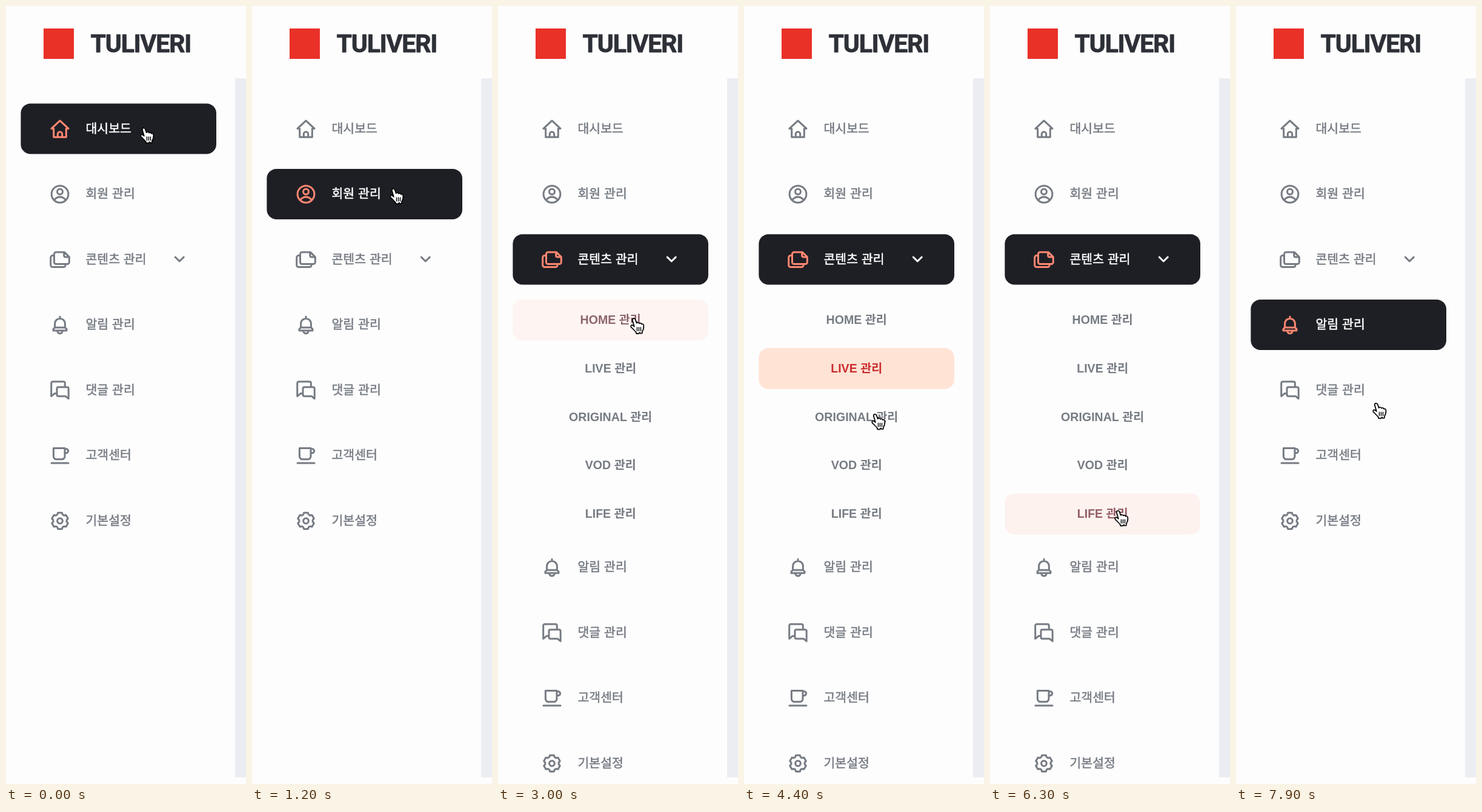
Animation of 396 by 1280 pixels, one loop 8 s. Source, as an HTML page with a canvas:

```html
<!DOCTYPE html>
<html lang="ko">
<head>
<meta charset="utf-8">
<title>관리 메뉴</title>
<style>
html, body { margin: 0; width: 100%; height: 100%; overflow: hidden; background: #fdfdfd; }
canvas { display: block; width: 396px; height: 1280px; }
</style>
</head>
<body>
<canvas id="stage"></canvas>
<script>
const W = 396, H = 1280, LOOP = 8000;
const canvas = document.getElementById('stage');
const ctx = canvas.getContext('2d');
const dpr = window.devicePixelRatio || 1;
canvas.width = W * dpr;
canvas.height = H * dpr;

const PAGE = [253, 253, 253], GREY = [118, 123, 131], DARK = [30, 31, 37];
const WHITE = [255, 255, 255], CORAL = [255, 135, 113], RED = [202, 45, 47];
const BLUSH = [254, 242, 239], PEACH = [255, 228, 214];
const MAIN_FONT = "500 20.5px 'Noto Sans CJK KR', 'Noto Sans CJK', sans-serif";
const SUB_FONT = "bold 19.6px 'Liberation Sans', 'Noto Sans CJK KR', 'Noto Sans CJK', sans-serif";
const LOGO_FONT = "bold 41px Roboto, sans-serif";

// Icon outlines are relative to the icon centre.
const icon = d => new Path2D(d);
const circle = (x, y, r) => `M${x + r} ${y}a${r} ${r} 0 1 1 ${-2 * r} 0a${r} ${r} 0 1 1 ${2 * r} 0z`;

function gear() {
  const points = [];
  for (let i = 0; i < 6; i++) {
    for (const [turn, r] of [[-23, 11.2], [-14, 13.8], [14, 13.8], [23, 11.2]]) {
      const a = (i * 60 - 90 + turn) * Math.PI / 180;
      points.push((r * Math.cos(a)).toFixed(2) + ' ' + (r * Math.sin(a)).toFixed(2));
    }
  }
  return 'M' + points.join('L') + 'z' + circle(0, 0, 4.4);
}

const items = [
  ['대시보드', icon('M-10.3-.4H-14L0-13.4L14-.4H10.3V13.7H-10.3zM-3.7 13.5V8.5a3.7 3.7 0 0 1 7.4 0V13.5')],
  ['회원 관리', icon(circle(0, 0, 13.9) + circle(0, -4.2, 4.5) + 'M-9.5 9.3Q0-.2 9.5 9.3')],
  ['콘텐츠 관리', icon('M-6-12H7.5L15.3-4.2V4.5a3 3 0 0 1-3 3H-6.5a3 3 0 0 1-3-3V-9a3 3 0 0 1 3-3z'
    + 'M6.7-11.5V-6.5a2.5 2.5 0 0 0 2.5 2.5H15M-10-6.6H-12a3.3 3.3 0 0 0-3.3 3.3V9.2a3.3 3.3 0 0 0 3.3 3.3H6a3 3 0 0 0 3-3V8')],
  ['알림 관리', icon('M0-13.5V-10.5M-8.4 4V-2a8.4 8.4 0 0 1 16.8 0V4L11 7.2V9.4H-11V7.2zM-8 4.4H8M-4.2 10.2a4.2 3.9 0 0 0 8.4 0')],
  ['댓글 관리', icon('M8.3-5.5V-11.5a2.5 2.5 0 0 0-2.5-2.5H-12a2.3 2.3 0 0 0-2.3 2.3V10L-9 5.5H-5'
    + 'M-2.5-5.2H11.7a2.5 2.5 0 0 1 2.5 2.5V14L9.5 10H-2.5a2.5 2.5 0 0 1-2.5-2.5V-2.7a2.5 2.5 0 0 1 2.5-2.5z')],
  ['고객센터', icon('M-10.6-12.2H8V1.4a4.8 4.8 0 0 1-4.8 4.8H-5.8A4.8 4.8 0 0 1-10.6 1.4zM8-10.8H10.4a3.3 3.3 0 0 1 0 6.6H8M-14 12.3H14')],
  ['기본설정', icon(gear())]
];
const subItems = ['HOME 관리', 'LIVE 관리', 'ORIGINAL 관리', 'VOD 관리', 'LIFE 관리'];
const chevron = icon('M-7-3.4L0 3.4L7-3.4');

const hand = icon('M4.2 4C4.4 1 8.3.7 9.3 3.6L11.2 9.2C12.3 7.6 15 8 15.5 9.8C16.8 8.6 19 9.2 19.4 11'
  + 'C20.8 10.2 22.7 11 22.9 13.2C23.2 17.5 22.2 20.2 20.6 22.6L20.2 26H17.6L16.4 24.6L14.8 26.4H10.8L10.2 24'
  + 'C8 21.5 5 18.6 2.2 15.8C.6 13.6 3 11.6 5 13L7.4 14.9z');
const creases = icon('M12 16.2V22M15 16.2V22M18 16.2V22');

// [start, index]
const mainClicks = [[-1000, 0], [850, 1], [1950, 2], [6950, 3]];
const subClicks = [[2925, 0], [3780, 1], [4560, 2], [5355, 3], [6210, 4]];
const OPEN = 1950, CLOSE = 6950;

// [time, left, top]
const cursorPath = [
  [0, 220.5, 199], [600, 226.5, 298], [900, 226.5, 298], [1200, 226.5, 299], [1700, 224.5, 407],
  [2000, 224.5, 407], [2900, 217.5, 512], [3100, 217.5, 513], [3700, 213.5, 587], [3900, 211.5, 592],
  [4400, 209.5, 670], [4800, 208.5, 675], [5350, 206.5, 741], [5600, 206.5, 742], [6200, 204.5, 828],
  [6350, 204.5, 829], [6700, 212.5, 950], [7000, 212.5, 950], [7800, 224.5, 653], [7900, 224.5, 652]
];

const clamp = v => Math.min(1, Math.max(0, v));
const lerp = (a, b, p) => a + (b - a) * p;
const mix = (a, b, p) => a.map((v, i) => lerp(v, b[i], p));
const rgb = c => `rgb(${c.map(Math.round).join(',')})`;

// Equivalent of the CSS "ease" curve.
function ease(x) {
  const bez = (u, a, b) => 3 * (1 - u) * (1 - u) * u * a + 3 * (1 - u) * u * u * b + u * u * u;
  let lo = 0, hi = 1;
  for (let i = 0; i < 16; i++) {
    const mid = (lo + hi) / 2;
    if (bez(mid, .25, .25) < x) lo = mid; else hi = mid;
  }
  return bez(lo, .1, 1);
}

function selected(clicks, t, duration) {
  const last = clicks.filter(c => c[0] <= t).pop();
  return last ? { index: last[1], p: ease(clamp((t - last[0]) / duration)) } : { index: -1, p: 0 };
}

function cursorAt(t) {
  const next = cursorPath.findIndex(k => k[0] > t);
  if (next < 0) return cursorPath[cursorPath.length - 1].slice(1);
  const [t0, x0, y0] = cursorPath[next - 1], [t1, x1, y1] = cursorPath[next];
  const u = (t - t0) / (t1 - t0), p = u * u * (3 - 2 * u);
  return [lerp(x0, x1, p), lerp(y0, y1, p)];
}

function bar(cy, height, color) {
  ctx.fillStyle = rgb(color);
  ctx.beginPath();
  ctx.roundRect(24.4, cy - height / 2, 322.6, height, 16);
  ctx.fill();
}

function strokeAt(path, x, y, color, width) {
  ctx.save();
  ctx.translate(x, y);
  ctx.strokeStyle = rgb(color);
  ctx.lineWidth = width;
  ctx.stroke(path);
  ctx.restore();
}

function label(text, x, y, font, align, color, { weight = 0, tracking = 0, space = 0 } = {}) {
  ctx.font = font;
  ctx.textAlign = align;
  ctx.letterSpacing = tracking + 'px';
  ctx.wordSpacing = space + 'px';
  ctx.fillStyle = ctx.strokeStyle = rgb(color);
  ctx.fillText(text, x, y);
  if (weight) {
    ctx.lineWidth = weight;
    ctx.strokeText(text, x, y);
  }
}

function drawHeader() {
  ctx.fillStyle = '#ecedf3';
  ctx.fillRect(378, 119, 18, 1150);
  ctx.fillStyle = '#e93127';
  ctx.fillRect(62, 37, 50, 50);
  label('TULIVERI', 139.5, 76, LOGO_FONT, 'left', [45, 48, 55], { weight: .8, tracking: -1.1 });
}

function drawMain(t, open) {
  const sel = selected(mainClicks, t, 300);
  items.forEach(([text, path], i) => {
    const cy = 201.9 + i * 107.5 + (open && i > 2 ? 399 : 0);
    const p = i === sel.index ? sel.p : 0;
    if (p > 0) bar(cy, 83, mix(PAGE, DARK, p));
    strokeAt(path, 89, cy + .2, mix(GREY, CORAL, p), 3);
    label(text, 131.5, cy + 6.7, MAIN_FONT, 'left', mix(GREY, WHITE, p), { weight: .5, space: 1.3 });
    if (i === 2) strokeAt(chevron, 286.3, cy - .3, mix(GREY, WHITE, p), 3);
  });
}

function drawSub(t) {
  const sel = selected(subClicks, t, 400);
  subItems.forEach((text, i) => {
    const cy = 516.6 + i * 79.8;
    const p = i === sel.index ? sel.p : 0;
    if (p > 0) bar(cy, 67.5, p < .35 ? mix(PAGE, BLUSH, p / .35) : mix(BLUSH, PEACH, (p - .35) / .65));
    label(text, 185.7, cy + 6.3, SUB_FONT, 'center', mix(GREY, RED, p));
  });
}

function drawCursor(t) {
  const [x, y] = cursorAt(t);
  ctx.save();
  ctx.translate(x, y);
  ctx.fillStyle = '#fff';
  ctx.strokeStyle = '#000';
  ctx.lineWidth = 1.7;
  ctx.save();
  ctx.shadowColor = 'rgba(0,0,0,.35)';
  ctx.shadowBlur = 2 * dpr;
  ctx.shadowOffsetY = dpr;
  ctx.fill(hand);
  ctx.restore();
  ctx.stroke(hand);
  ctx.lineWidth = 1.4;
  ctx.stroke(creases);
  ctx.restore();
}

function draw(t) {
  ctx.setTransform(dpr, 0, 0, dpr, 0, 0);
  ctx.lineCap = ctx.lineJoin = 'round';
  ctx.fillStyle = rgb(PAGE);
  ctx.fillRect(0, 0, W, H);
  const open = t >= OPEN && t < CLOSE;
  drawHeader();
  drawMain(t, open);
  if (open) drawSub(t);
  drawCursor(t);
}

const start = performance.now();
function tick() {
  draw((performance.now() - start) % LOOP);
  requestAnimationFrame(tick);
}
tick();
</script>
</body>
</html>
```
